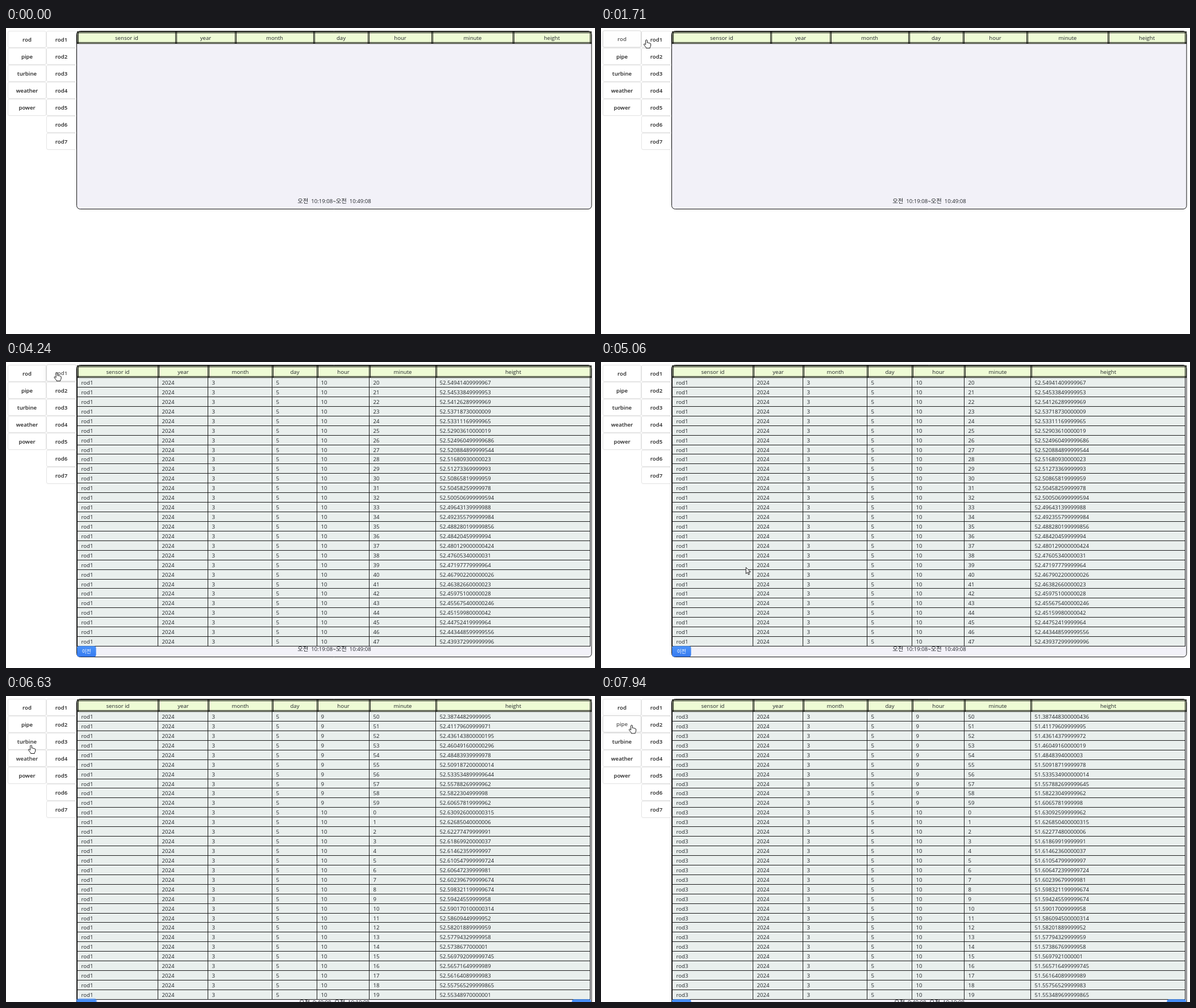
Animation, 1037 px wide and 540 px high, one loop 8 s. Source, as an HTML page with a canvas:

```html
<!DOCTYPE html>
<html lang="ko">
<head>
<meta charset="utf-8">
<title>Sensor table</title>
<style>
html, body { margin: 0; width: 100%; height: 100%; overflow: hidden; background: #fff; }
canvas { display: block; width: 1037px; height: 540px; }
</style>
</head>
<body>
<canvas id="stage" width="1037" height="540"></canvas>
<script>
const ctx = document.getElementById('stage').getContext('2d');
const LOOP = 8000;
const LATIN = '"Open Sans", "Noto Sans", sans-serif';
const HANGUL = '"Noto Sans CJK KR", "Noto Sans CJK", sans-serif';
const TITLES = ['sensor id', 'year', 'month', 'day', 'hour', 'minute', 'height'];
const EMPTY_COLS = [126, 299, 404, 542, 638, 750, 893, 1029];
const FULL_COLS = [126, 268, 356, 469, 548, 640, 757, 1029];
const ROW = 16.93, TOP = 28.03;

const VIEWS = [
  { from: 0, bottom: 319.5, span: ['10:19:08', '10:49:08'] },
  { from: 4240, bottom: 520.5, span: ['10:19:08', '10:49:08'], id: 'rod1', level: 52, minute: 20, count: 28 },
  { from: 6020, bottom: 554.5, span: ['9:49:08', '10:19:08'], id: 'rod1', level: 52, minute: -10, count: 30 },
  { from: 7260, bottom: 554.5, span: ['9:49:08', '10:19:08'], id: 'rod3', level: 51, minute: -10, count: 30 }
];

// Height climbs until 10:00, then sinks slowly; m counts minutes from 10:00
function height(level, m) {
  const slope = m < 0 ? 0.02434777 : -0.004075595;
  const wave = Math.sin((m + level) * 12.9898) * 43758.5453;
  const rounding = (wave - Math.floor(wave) - 0.5) * 1e-12;
  return Number((level + 0.630926 + slope * m).toFixed(7)) + rounding;
}

const menu = (labels, x, w) => labels.map((label, i) => ({ label, x, y: 5 + 30 * i, w, h: 30 }));
const BUTTONS = [
  ...menu(['rod', 'pipe', 'turbine', 'weather', 'power'], 3, 68),
  ...menu([1, 2, 3, 4, 5, 6, 7].map(n => 'rod' + n), 71, 53)
];
const PRESSES = { rod: 1370, rod1: 2280, rod3: 7000 };
const PRESS_TIME = 110;
const PAGING_FROM = 2350, FOCUS_FROM = 5800;

// Pointer hot spot: time, x, y
const PATH = [
  [200, 430, 536], [900, 50, 22], [1560, 52, 22], [1705, 80, 20.5], [1900, 89.5, 18.5],
  [4500, 89.5, 18.5], [5300, 309, 474], [5750, 153, 508], [6400, 153, 508],
  [6530, 58, 122], [6600, 44, 86.5], [6880, 97, 78], [7240, 97, 78], [7680, 54, 51]
];

// The pointer moves in steps of 68 ms
function pointer(time) {
  if (time < PATH[0][0]) return null;
  const t = Math.max(PATH[0][0], Math.floor((time - 10) / 68) * 68 + 10);
  const i = PATH.findIndex(p => p[0] > t);
  if (i < 0) return PATH[PATH.length - 1].slice(1);
  const [t0, x0, y0] = PATH[i - 1], [t1, x1, y1] = PATH[i];
  const u = (t - t0) / (t1 - t0), e = u * u * (3 - 2 * u);
  return [x0 + (x1 - x0) * e, y0 + (y1 - y0) * e];
}

const inside = (p, b) => p && p[0] >= b.x && p[0] < b.x + b.w && p[1] >= b.y && p[1] < b.y + b.h;

// Share of the last 250 ms for which a condition held
function recent(time, test) {
  let n = 0;
  for (let k = 0; k < 25; k++) if (test(time - k * 10)) n++;
  return n / 25;
}

function text(str, x, y, { align = 'left', color = '#212529', weight = 400, size = 9.6, family = LATIN } = {}) {
  ctx.font = `${weight} ${size}px ${family}`;
  ctx.textAlign = align;
  ctx.fillStyle = color;
  ctx.fillText(str, x, y);
}

function box(x, y, w, h, r) {
  ctx.beginPath();
  ctx.roundRect(x, y, w, h, r);
}

function menuButton(b, time) {
  const hover = recent(time, t => inside(pointer(t), b));
  const pressed = PRESSES[b.label];
  const down = pressed ? recent(time, t => t >= pressed && t < pressed + PRESS_TIME) : 0;
  const y = b.y - 0.7 * hover * (1 - down);
  const shade = 255 - 15 * down;
  ctx.save();
  ctx.shadowColor = `rgba(0,0,0,${0.02 + 0.08 * hover})`;
  ctx.shadowBlur = 2 + 5 * hover;
  ctx.shadowOffsetY = 0.6 + 1.8 * hover;
  ctx.fillStyle = `rgb(${shade},${shade},${shade})`;
  box(b.x + 0.2, y + 0.2, b.w - 0.4, b.h - 0.4, 2.4);
  ctx.fill();
  ctx.restore();
  ctx.strokeStyle = `rgba(0,0,0,${0.1 + 0.05 * hover})`;
  ctx.lineWidth = 1;
  box(b.x + 0.5, y + 0.5, b.w - 1, b.h - 1, 2.4);
  ctx.stroke();
  text(b.label, b.x + b.w / 2, Math.round(y + 18.9), {
    align: 'center', weight: 600, color: `rgba(0,0,0,${0.88 - 0.22 * hover})`
  });
}

function pageButton(label, x, y, focus) {
  if (focus) {
    ctx.fillStyle = 'rgba(70,135,245,0.5)';
    box(x - 1.7, y - 1.7, 37, 22.4, 5);
    ctx.fill();
  }
  const g = ctx.createLinearGradient(0, y, 0, y + 19);
  g.addColorStop(0, '#4b93f9');
  g.addColorStop(1, '#367af0');
  ctx.fillStyle = g;
  box(x, y, 33.6, 19, 3.6);
  ctx.fill();
  text(label, x + 16.8, y + 12.8, { align: 'center', color: '#fff', size: 8.7, family: HANGUL });
}

function timeSpan([a, b], y) {
  ctx.font = `400 9.6px ${LATIN}`;
  const first = a + '~', gap = 24;
  const w1 = ctx.measureText(first).width, w2 = ctx.measureText(b).width;
  let x = 578 - (w1 + w2 + 2 * gap) / 2;
  for (const [part, w] of [[first, w1], [b, w2]]) {
    text('오전', x, y, { size: 10.4, family: HANGUL });
    text(part, x + gap, y);
    x += gap + w;
  }
}

// Cells framed by double lines: black, gap, black
function header(cols) {
  ctx.fillStyle = '#eefbd5';
  ctx.fillRect(125, 6, 906, 22);
  ctx.fillStyle = '#000';
  for (const y of [6, 8, 25, 27]) ctx.fillRect(125, y, 906, 1);
  for (const x of cols) for (const dx of [-1, 1]) ctx.fillRect(x + dx, 6, 1, 22);
  TITLES.forEach((title, i) => text(title, (cols[i] + cols[i + 1]) / 2, 21, { align: 'center' }));
}

function rows({ id, level, minute, count }) {
  const end = Math.round(TOP + count * ROW);
  ctx.fillStyle = '#e9efed';
  ctx.fillRect(125, 28, 904, end - 28);
  ctx.fillStyle = '#1a1a1a';
  for (const x of FULL_COLS) ctx.fillRect(x - 1, 28, 1, end - 28);
  for (let i = 0; i < count; i++) {
    const y = Math.round(TOP + i * ROW), m = minute + i;
    ctx.fillStyle = '#1a1a1a';
    ctx.fillRect(125, Math.round(TOP + (i + 1) * ROW) - 1, 904, 1);
    const cells = [id, 2024, 3, 5, m < 0 ? 9 : 10, (m + 60) % 60, height(level, m)];
    cells.forEach((c, k) => text(c, FULL_COLS[k] + 6.5, y + 12));
  }
}

function panel(view, time) {
  const { bottom } = view, cols = view.count ? FULL_COLS : EMPTY_COLS;
  box(124.5, 5.5, 906.5, bottom - 5.5, 6);
  ctx.fillStyle = '#f2f1f8';
  ctx.fill();
  ctx.strokeStyle = '#111';
  ctx.lineWidth = 1;
  ctx.stroke();
  if (view.count) rows(view);
  header(cols);
  timeSpan(view.span, Math.round(bottom - 10.6));
  const focus = time >= FOCUS_FROM && time < PRESSES.rod3;
  if (time >= PAGING_FROM) pageButton('이전', 125, bottom - 19.3, focus);
  if (view.minute < 0) pageButton('다음', 996.4, bottom - 19.3, false);
}

const ARROW = new Path2D('M0 0V11.2L2.6 8.8L4.4 12.8L6.2 12L4.5 8.1H8Z');
const HAND = new Path2D(`M-1.4 8V1.2Q0-.6 1.4 1.2V5.6Q2.7 4.6 3.8 6Q5 5.2 6.1 6.7Q7.4 6.3 7.6 7.6
  V10.5Q7.4 12.3 6.2 13.6V15H-.6V13.8Q-2.6 12-4.6 8.6Q-4.3 6.6-2.6 7.9L-1.4 9Z`);

function drawPointer(time) {
  const p = pointer(time);
  if (!p) return;
  const shape = BUTTONS.some(b => inside(p, b)) ? HAND : ARROW;
  ctx.save();
  ctx.translate(...p);
  ctx.lineJoin = 'round';
  ctx.lineWidth = 1;
  ctx.fillStyle = '#fff';
  ctx.strokeStyle = '#1a1a1a';
  ctx.fill(shape);
  ctx.stroke(shape);
  ctx.restore();
}

function draw(time) {
  ctx.fillStyle = '#fff';
  ctx.fillRect(0, 0, 1037, 540);
  BUTTONS.forEach(b => menuButton(b, time));
  panel(VIEWS.filter(v => time >= v.from).pop(), time);
  drawPointer(time);
}

const start = performance.now();
function tick() {
  draw((performance.now() - start) % LOOP);
  requestAnimationFrame(tick);
}
tick();
</script>
</body>
</html>
```
